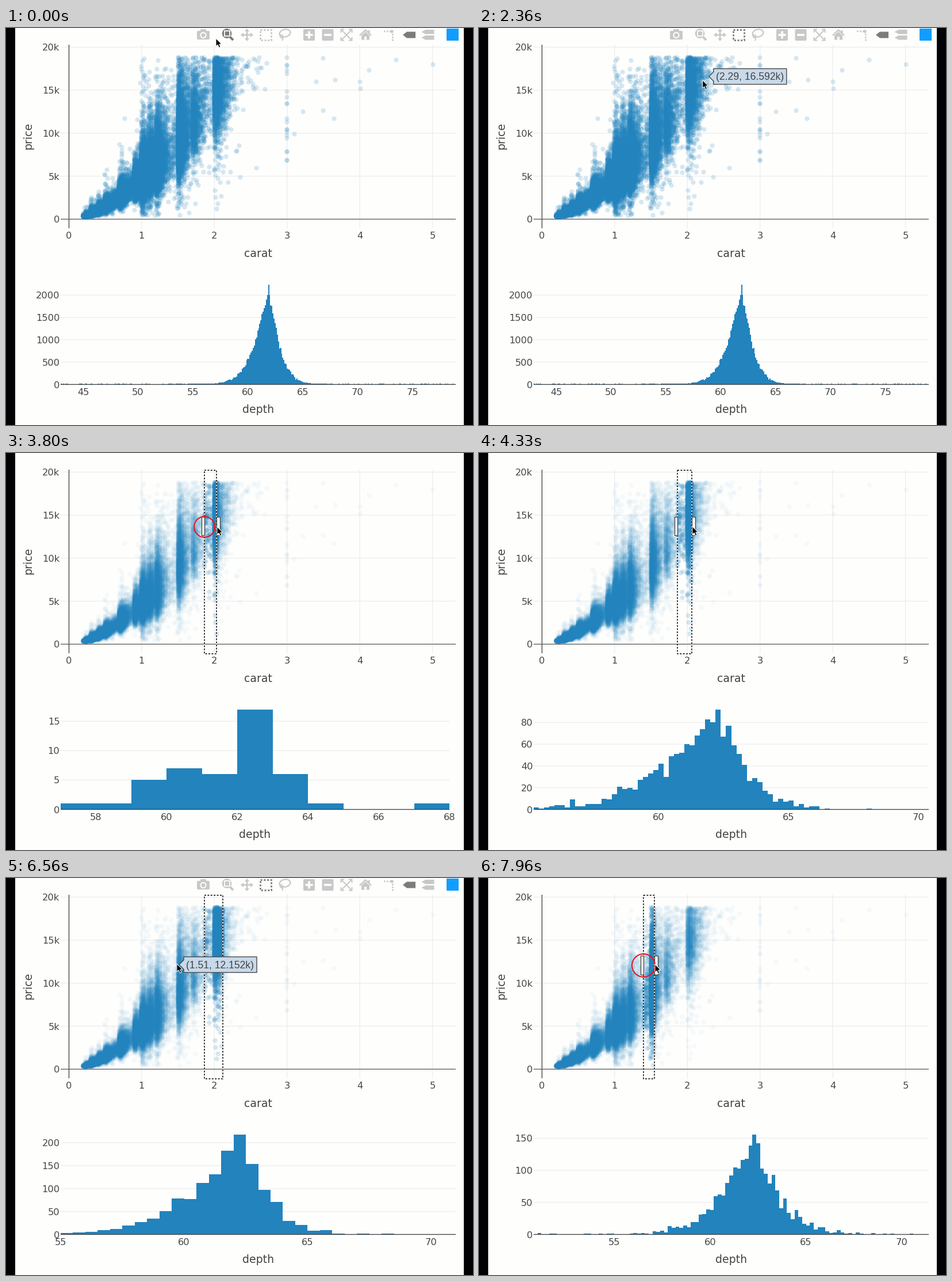
These frames come from a looping animation (812x690 px, 8 s). A matplotlib script:

```python
import numpy as np
import matplotlib.pyplot as plt
from matplotlib.animation import FuncAnimation
from matplotlib.patches import Circle, Ellipse, FancyBboxPatch, Polygon, Rectangle

W, H, DPI = 812, 690, 64
PT = 72 / DPI
STEP, LOOP = 40, 8000
BG, INK, BLUE = "#fefefd", "#444444", "#2283bd"
GRID, IDLE, ACTIVE = "#eeeeee", "#c8c8c8", "#7c7c7c"
L, R, TOP, BOTTOM = 95, 783, 29, 349
BASE, PEAK = 619.5, 173.8
RELEASE, SECOND_DRAG = 5400, 7080
rng = np.random.default_rng(7)

fig = plt.figure(figsize=(W / DPI, H / DPI), dpi=DPI, facecolor=BG)
ax = fig.add_axes([0, 0, 1, 1])
ax.axis("off")


def add(patch, z=3):
    patch.set_zorder(z)
    return ax.add_patch(patch)


def line(xs, ys, color, width=1.35, z=1, **kw):
    return ax.plot(xs, ys, color=color, lw=width * PT, zorder=z,
                   solid_capstyle="butt", snap=False, **kw)[0]


def text(x, y, s, size=16.2, color=INK, ha="center", z=6, font="DejaVu Sans", **kw):
    return ax.text(x, y, s, fontsize=size * PT, color=color, ha=ha,
                   va="baseline", fontname=font, zorder=z, **kw)


def px(carat):
    return 109.5 + 126.4 * np.asarray(carat)


def py(price):
    return 332.3 - 14.95 * np.asarray(price)


# ---- diamonds: popular round weights over an exponential background ---------
POPULAR = {.23: 2000, .3: 9500, .4: 5000, .5: 5500, .7: 6500, .9: 2700, 1: 8000,
           1.1: 2500, 1.2: 3000, 1.5: 3700, 1.7: 900, 2: 2600}
FAR = [(3.5, 18.7), (3.4, 16), (3.66, 16.2), (4.13, 17.3), (4.5, 18.5), (5.01, 18),
       (4, 16), (4.01, 15.2), (3.22, 12.5), (3.5, 12.6), (3.65, 11.7), (3.1, 9.9)]


def diamonds():
    carat = [.2 + rng.exponential(.52, 9000)]
    carat += [c + rng.exponential(.02 + .015 * c * c, n) for c, n in POPULAR.items()]
    carat = np.floor(np.concatenate(carat) * 100 + 1e-6) / 100
    carat = carat[carat < 2.75]
    n = carat.size
    sigma = .2 + .1 * np.exp(-((carat - 1.3) / .35) ** 2)
    stray = (rng.random(n) < .1) * rng.choice([-1, 1], n)
    spread = rng.normal(0, sigma) + stray * rng.exponential(.2 + .25 * (carat > .95))
    price = 4.7 * carat ** 1.68 * np.exp(spread)
    keep = (price > .33) & (price < 18.82)
    carat, price = carat[keep], price[keep]
    far_c, far_p = np.transpose(FAR)
    carat = np.concatenate([carat, far_c, np.full(20, 3.0)])
    price = np.concatenate([price, far_p, rng.uniform(6.5, 18.8, 20)])
    return px(carat), py(price)


X, Y = diamonds()
SHAPE = (BOTTOM - TOP, R - L)
gy, gx = np.mgrid[-6:7, -6:7]
dot = np.zeros(SHAPE)
dot[:13, :13] = np.clip(4.55 - np.hypot(gx, gy), 0, 1)
DOT = np.fft.rfft2(np.roll(dot, (-6, -6), (0, 1)))


def density(mask):
    """How many markers cover each pixel."""
    n = np.histogram2d(Y[mask], X[mask], bins=SHAPE, range=((TOP, BOTTOM), (L, R)))[0]
    return np.clip(np.fft.irfft2(np.fft.rfft2(n) * DOT, s=SHAPE), 0, None)


ALL = density(X > 0)
RGB = [int(BLUE[k:k + 2], 16) for k in (1, 3, 5)]


def cloud(window):
    if window is None:
        clear = .82 ** ALL
    else:
        picked = density((X >= window[0]) & (X <= window[1]))
        clear = .82 ** picked * .96 ** np.clip(ALL - picked, 0, None)
    img = np.empty(SHAPE + (4,), np.uint8)
    img[..., :3] = RGB
    img[..., 3] = np.round(255 * (1 - clear))
    return img


# ---- depth counts: (low end, bin width, counts) -----------------------------
def bell(lo, width, bins, peak, mid, fall_left, fall_right):
    """A skewed, noisy bell with a scatter of single counts in the tails."""
    d = lo + width * (np.arange(bins) + .5) - mid
    fall = np.where(d < 0, fall_left, fall_right)
    n = rng.poisson(.92 * peak * np.exp(-fall * np.abs(d) ** 1.3) + .3)
    n = np.minimum(n, .97 * peak)
    n[np.argmin(np.abs(d))] = peak
    return lo, width, n


FULL = bell(42.95, .1, 360, 2239, 61.9, .583, .83)
FINE = bell(55.2, .2, 76, 113, 62.3, .34, .72)
COARSE = bell(55, .5, 32, 218, 62.25, .36, .7)
SECOND = bell(50.8, .2, 103, 156, 62.3, .44, .6)
FEW = 57, 1, [1, 1, 5, 7, 6, 17, 6, 1, 0, 0, 1]


def scaled(hist, k):
    lo, w, n = hist
    return lo, w, np.ceil(np.array(n) * k - 1e-9)


def depth_at(t, x):
    if t < 3160:
        return FULL
    if t < 3840:
        return scaled(FEW, np.interp(t, [3160, 3700], [.25, 1]))
    if t < RELEASE + 80:
        return scaled(FINE, np.interp(x, [367, 378], [.7, 1]))
    if t < SECOND_DRAG + 40:
        return COARSE
    if t < 7600:
        return scaled(COARSE, np.interp(t, [7120, 7600], [.1, .35]))
    return scaled(SECOND, np.interp(x, [299, 306], [.8, 1]))


def nice(rough):
    p = 10 ** np.floor(np.log10(rough))
    return next(m * p for m in (1, 2, 5, 10) if m * p >= rough)


# ---- fixed parts ------------------------------------------------------------
for left in (0, 796):
    add(Rectangle((left, 0), 16, H, color="#020104", lw=0), 1)
for k in range(6):
    line([px(k)] * 2, [TOP, BOTTOM - 1], GRID if k else INK, z=1 if k else 1.5)
    text(px(k), 366, str(k))
for k in range(0, 21, 5):
    line([L, 782], [py(k)] * 2, GRID if k else "#606060", z=1 if k else 1.5)
    text(93.5, py(k) + 6, f"{k}k" if k else "0", ha="right")
text(438.5, 398, "carat", 18.9)
text(44, 187.5, "price", 18.9, rotation=90, rotation_mode="anchor")
depth_title = text(438.5, 669, "depth", 18.9)


# ---- mode bar ---------------------------------------------------------------
def block(x, y, w, h, color=IDLE, r=1.5):
    return add(FancyBboxPatch((x + r, y + r), w - 2 * r, h - 2 * r, fc=color, lw=0,
                              boxstyle=f"round,pad={r},rounding_size={r}"))


def shape(points, color=IDLE):
    return add(Polygon(points, fc=color, lw=0))


def disc(x, y, r, color=IDLE):
    return add(Circle((x, y), r, fc=color, lw=0))


def stroke(xs, ys, width, color=IDLE):
    return line(xs, ys, color, width, 3)


def tag(x, y, w, h, color=IDLE):
    shape([(x, y + h / 2), (x + 7, y), (x + w, y), (x + w, y + h), (x + 7, y + h)], color)


def mode_bar():
    block(332, 5, 22, 15, r=2)
    block(338, 2, 10, 6)
    disc(343, 12.5, 5.6, BG)
    disc(343, 12.5, 3.6)

    zoom = [disc(384, 9.5, 8.3), stroke([389, 395], [15, 21], 4)]
    add(Rectangle((379.5, 5), 9, 9, fc="none", ec=BG, lw=1.8 * PT))

    for dx, dy in ((1, 0), (-1, 0), (0, 1), (0, -1)):
        stroke([419, 419 + 8 * dx], [12, 12 + 8 * dy], 2.6)
        shape([(419 + a * dx + b * dy, 12 + a * dy + b * dx)
               for a, b in ((11, 0), (6, 4), (6, -4))])

    box = [add(Rectangle((442.2, 2.7), 18.4, 18.4, fc="none", lw=2.8 * PT,
                         ls=(0, (1.1, .95))))]

    add(Ellipse((485, 9), 19, 13, angle=-12, fc="none", ec=IDLE, lw=2.2 * PT))
    add(Circle((479, 14.5), 2.6, fc="none", ec=IDLE, lw=1.5 * PT))
    stroke([479.5, 481.5, 480], [17, 19, 22], 1.8)

    for x in (527, 559.5):
        block(x - 10, 2, 20, 20, r=2)
        stroke([x - 6.5, x + 6.5], [12, 12], 3.6, BG)
    stroke([527, 527], [5.5, 18.5], 3.6, BG)

    for sx in (-1, 1):
        for sy in (-1, 1):
            stroke([592, 592 + 9 * sx], [12, 12 + 9 * sy], 2)
            stroke([592 + 4 * sx, 592 + 9.5 * sx, 592 + 9.5 * sx],
                   [12 + 9.5 * sy, 12 + 9.5 * sy, 12 + 4 * sy], 2)

    stroke([615, 625, 635], [13, 3.5, 13], 2.4)
    shape([(618, 13), (625, 6.5), (632, 13), (632, 20.5), (618, 20.5)])
    block(623, 15, 4, 5.5, BG, .1)
    block(629.5, 4, 3, 5, r=.5)

    for k in range(3):
        block(671, 10 + 4.8 * k, 2.7, 2.7, r=.3)
        block(657 + 5 * k, 4.5, 2.7, 2.7, r=.3)
    block(668.5, 3.5, 5, 5, r=1)
    tag(690, 6.5, 22, 11, ACTIVE)
    tag(722.5, 3, 22, 7.5)
    tag(722.5, 13, 22, 7.5)
    add(Rectangle((766, 1), 21, 21, fc="#119dff", lw=0))
    return zoom, box


zoom_icon, box_icon = mode_bar()
veil = add(Rectangle((330, 0), 460, 25, fc=BG, lw=0), 4)


def tint(icon, on):
    for part in icon:
        part.set_color(ACTIVE if on else IDLE)
    if icon is box_icon:
        icon[0].set_facecolor("none")


# ---- moving parts -----------------------------------------------------------
points = ax.imshow(cloud(None), extent=(L, R, BOTTOM, TOP), interpolation="nearest",
                   aspect="auto", zorder=2.5)
bars = add(Polygon([(0, 0), (1, 0), (1, 1)], fc=BLUE, lw=0, antialiased=False), 3)
axis_line = line([L, 782], [BASE] * 2, INK, z=4)
y_grid = [line([L, 782], [0, 0], GRID) for _ in range(6)]
y_text = [text(93.5, 0, "", ha="right") for _ in range(6)]
x_text = [text(0, 637.5, "") for _ in range(10)]

frame = [add(Rectangle((0, 29.5), 1, 319, fc="none", ec=c, lw=1.5 * PT, ls=ls), 7)
         for c, ls in (("white", "-"), ("black", (0, (2, 1.6))))]
grips = [add(Rectangle((0, 0), 5.2, 32.4, fc="white", ec=INK, lw=1.35 * PT), 7)
         for _ in range(2)]
label = add(Polygon([(0, 0), (1, 0), (1, 1)], fc="#c8d9e9", ec=INK, lw=1.35 * PT), 8)
label_text = text(0, 0, "", 17.55, ha="left", z=9, font="Liberation Sans")
tip = [add(FancyBboxPatch((364, 34), 109, 33, fc="#76809a", lw=0,
                          boxstyle="round,pad=2,rounding_size=2"), 8),
       add(Polygon([(444, 33), (458, 33), (451, 25.5)], fc="#76809a", lw=0), 8),
       text(418.5, 57, "Box Select", color="white", z=9)]
ring = add(Circle((0, 0), 5, fc="none", ec="#e8141c", lw=2 * PT), 10)
ARROW = .9 * np.array([(0, 0), (0, 15.5), (3.6, 12.4), (6, 18), (8.8, 16.8),
                       (6.4, 11.3), (11, 11)])
pointer = add(Polygon(ARROW, fc="black", ec="white", lw=PT), 11)

# time, x, y of the pointer; time, carat, price of the hovered diamond
PATH = np.transpose([
    (100, 365, 18), (530, 453, 10), (1780, 453, 10), (2600, 362, 124),
    (2860, 345, 127), (3080, 345, 127), (3800, 367, 128), (5230, 378, 127),
    (5880, 378, 127), (6500, 297, 149), (6730, 297, 149), (7000, 286, 152),
    (SECOND_DRAG, 286, 152), (7960, 306, 150)])
HOVER = np.transpose([
    (1920, 2.63, 18.701), (2760, 1.84, 13.779), (5880, 2.06, 13.528),
    (6480, 1.51, 12.152), (6720, 1.51, 12.152), (6960, 1.4, 12.035)])
PRESSES = [(960, 452.5, 12.5), (3000, 345, 128.5), (7030, 286, 152)]


def along(track, t):
    return [np.interp(t, track[0], row) for row in track[1:]]


def window_at(t):
    if t < 3120:
        return None
    start = 344.7 if t < SECOND_DRAG else 285.7
    x = along(PATH, min(t, RELEASE) if t < SECOND_DRAG else t)[0]
    return start, max(start + 1, x - .7)


def draw_depth(lo, w, n):
    n = np.asarray(n, float)
    hi, top = lo + w * len(n), n.max()
    step = nice((hi - lo) / 7.4)
    # a label on the very edge makes the plot shrink
    on_edge = abs(hi / step - round(hi / step)) < 1e-6
    right = 771 if on_edge else 782
    to_x = lambda v: L + (v - lo) * (right - L) / (hi - lo)
    h = np.where(n > 0, np.maximum(n * PEAK / top, 1.5), 0)
    xs = np.repeat(to_x(lo + w * np.arange(len(n) + 1)), 2)
    ys = BASE - np.concatenate([[0], np.repeat(h, 2), [0]])
    bars.set_xy(np.column_stack([xs, ys]))
    axis_line.set_xdata([L, right])
    depth_title.set_x((L + right) / 2)

    dy = nice(top * 1.05 / 5)
    for k, (g, s) in enumerate(zip(y_grid, y_text)):
        y = BASE - k * dy * PEAK / top
        shown = k * dy <= top * 1.05
        g.set_visible(shown and k > 0)
        g.set_data([L, right], [y, y])
        s.set_visible(shown)
        s.set_y(y + 6)
        s.set_text(f"{k * dy:g}")
    first = np.ceil(lo / step - 1e-9) * step
    for k, s in enumerate(x_text):
        v = first + k * step
        s.set_visible(v <= hi + 1e-6)
        s.set_x(to_x(v))
        s.set_text(f"{v:g}")


def draw_hover(t):
    shown = 1920 <= t < 3120 or 5900 <= t < SECOND_DRAG
    label.set_visible(shown)
    label_text.set_visible(shown)
    carat, price = along(HOVER, t - t % 120)
    x, y, a = px(carat) + .6, py(price), 8.1
    edge = x + a + 127
    label.set_xy([(x, y), (x + a, y + a), (x + a, y + 13.6), (edge, y + 13.6),
                  (edge, y - 13.6), (x + a, y - 13.6), (x + a, y - a)])
    label_text.set_position((x + a + 4, y + 6.2))
    label_text.set_text(f"({carat:.2f}, {price:.3f}k)")


def draw_selection(t):
    window = window_at(t)
    points.set_data(cloud(window))
    dragging = window is not None and not RELEASE <= t < SECOND_DRAG
    for f in frame:
        f.set_visible(window is not None)
    for g in grips:
        g.set_visible(dragging)
    if window is None:
        return
    x0, x1 = window
    top = (127 if t < SECOND_DRAG else 151.3) - 16.2
    for f in frame:
        f.set_x(x0)
        f.set_width(x1 - x0)
    grips[0].set_xy((x0 - 5.2, top))
    grips[1].set_xy((x1, top))


def update(i):
    t = i * STEP
    x, y = along(PATH, t)
    pointer.set_xy(ARROW + (x, y))
    draw_selection(t)
    draw_depth(*depth_at(t, x))
    draw_hover(t)

    press = next((p for p in PRESSES if 0 <= t - p[0] < 950), None)
    ring.set_visible(press is not None)
    if press:
        ring.set_center(press[1:])
        ring.set_radius(5.4 + .0157 * (t - press[0]))

    veil.set_alpha(np.interp(t, [3020, 3320, 5880, 6100, 7060, 7360], [0, 1, 1, 0, 0, 1]))
    tint(zoom_icon, t < 960)
    tint(box_icon, t >= 450)
    for part in tip:
        part.set_visible(450 <= t < 1840)
    return []


ax.set_xlim(0, W)
ax.set_ylim(H, 0)
anim = FuncAnimation(fig, update, frames=LOOP // STEP, interval=STEP, repeat=True,
                     repeat_delay=0, cache_frame_data=False)
plt.show()
```
